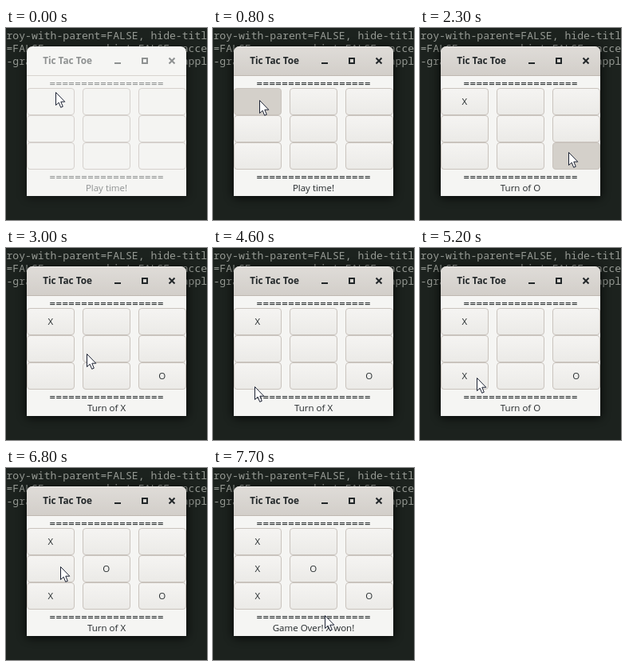
An HTML page that plays this animation: 252x240 px, repeating every 7800 ms.

```html
<!DOCTYPE html>
<html lang="en">
<head>
<meta charset="utf-8">
<title>Tic Tac Toe</title>
<style>
html, body { margin: 0; width: 100%; height: 100%; overflow: hidden; background: #1c221e; }
svg { display: block; width: 252px; height: 240px; }
text { font-family: "Open Sans", "Noto Sans", sans-serif; font-size: 11.5px; white-space: pre; }
.mid { text-anchor: middle; }
.code text { font-family: "Noto Sans Mono", "DejaVu Sans Mono", monospace; font-size: 13.12px; fill: #969a94; }
text.rule { font-family: "Noto Sans Mono", "DejaVu Sans Mono", monospace; font-size: 13.3px; }
text.title { font-size: 11.75px; font-weight: 700; }
</style>
</head>
<body>
<svg viewBox="0 0 252 240" xmlns="http://www.w3.org/2000/svg">
  <defs>
    <linearGradient id="bar" x2="0" y2="1">
      <stop stop-color="#dfdcd8"/><stop offset="1" stop-color="#d2cec9"/>
    </linearGradient>
    <linearGradient id="face" x2="0" y2="1">
      <stop stop-color="#f5f4f2"/><stop offset="1" stop-color="#ebeae7"/>
    </linearGradient>
    <filter id="blur" x="-20%" y="-20%" width="140%" height="140%">
      <feGaussianBlur stdDeviation="6"/>
    </filter>
  </defs>
  <rect width="252" height="240" fill="#1c221e"/>
  <g class="code">
    <text x=".5" y="13.5">roy-with-parent=FALSE, hide-titl</text>
    <text x=".5" y="29.5">=FALSE, urgency-hint=FALSE, acce</text>
    <text x=".5" y="45.5">-gravity=GDK_GRAVITY_NORTH, appl</text>
  </g>
  <rect id="shadow" x="24" y="24" width="204" height="189" rx="7" fill="#000" filter="url(#blur)"/>
  <path d="M26 210V30a7 7 0 0 1 7-7H219a7 7 0 0 1 7 7V210Z" fill="#f5f5f3"/>
  <g id="active">
    <path d="M26 60V30a7 7 0 0 1 7-7H219a7 7 0 0 1 7 7V60Z" fill="url(#bar)"/>
    <path d="M32 23.5H220" stroke="#efedeb"/>
  </g>
  <path id="edge" d="M26 59.5H226"/>
  <g id="ink">
    <text class="title mid" x="77" y="45">Tic Tac Toe</text>
    <path d="M136 43h8v2h-8z"/>
    <path d="M170 37h8v8h-8zM172 39v4h4v-4z" fill-rule="evenodd"/>
    <path id="close" d="M204.5 37.5l7 7m0-7l-7 7" stroke-width="2"/>
    <text class="rule mid" x="126" y="73.5">==================</text>
    <text class="rule mid" x="126" y="190.5">==================</text>
    <text class="mid" id="status" x="126" y="204"></text>
  </g>
  <g id="cells"></g>
  <path id="cursor" d="M.5 .5V16.5L4.2 13.2L6.7 19.3L9.3 18.2L6.8 12.2H11.8Z" fill="#fff" stroke="#1c2233" stroke-linejoin="round"/>
</svg>
<script>
const LOOP = 7800, STEP = 100;
const $ = id => document.getElementById(id);

// cell, mark, press time, release time
const moves = [
  [0, "X", 700, 1000],
  [8, "O", 2300, 2500],
  [6, "X", 4900, 5100],
  [4, "O", 5900, 6200],
  [3, "X", 7000, 7200]
];
const labels = ["Play time!", "Turn of O", "Turn of X", "Turn of O", "Turn of X", "Game Over! X won!"];

// time, x, y of the pointer tip
const path = [
  [0, 62, 80], [100, 62, 80], [200, 58, 90], [1300, 58, 90],
  [1800, 156, 150], [2100, 186, 155], [2500, 186, 155],
  [2900, 102, 139], [3000, 101, 132], [3400, 100, 130], [4000, 100, 130],
  [4600, 52, 173], [5100, 52, 172], [5500, 128, 130], [5800, 138, 126],
  [6000, 138, 126], [6300, 136, 126], [6800, 68, 123], [7200, 68, 124], [7700, 140, 184]
];

function add(parent, name, attrs) {
  const el = document.createElementNS("http://www.w3.org/2000/svg", name);
  for (const key in attrs) el.setAttribute(key, attrs[key]);
  return parent.appendChild(el);
}

const cells = Array.from({ length: 9 }, (_, i) => {
  const x = 26 + i % 3 * 70, y = 75 + Math.floor(i / 3) * 34;
  const box = add($("cells"), "rect", { x: x + .5, y: y + .5, width: 59, height: 33, rx: 3.5 });
  const mark = add($("cells"), "text", { class: "mid", x: x + 29.7, y: y + 21, fill: "#262c2e" });
  return { box, mark };
});

const lerp = (a, b, k) => a + (b - a) * k;
const clamp = v => Math.max(0, Math.min(1, v));
const mix = (a, b, k) => `rgb(${a.map((v, i) => Math.round(lerp(v, b[i], k)))})`;

function pointer(t) {
  const i = path.findIndex(p => p[0] >= t);
  if (i <= 0) return path[0].slice(1);
  const [t0, x0, y0] = path[i - 1], [t1, x1, y1] = path[i];
  const k = (t - t0) / (t1 - t0);
  return [lerp(x0, x1, k), lerp(y0, y1, k)];
}

function draw(t) {
  const focus = clamp((t - 500) / 200);
  const ink = mix([142, 145, 145], [34, 39, 41], focus);
  $("active").setAttribute("opacity", focus);
  $("shadow").setAttribute("opacity", lerp(.4, .65, focus));
  $("edge").setAttribute("stroke", mix([216, 212, 208], [191, 184, 177], focus));
  $("ink").setAttribute("fill", ink);
  $("close").setAttribute("stroke", ink);

  for (const { box, mark } of cells) {
    box.setAttribute("fill", focus > .4 ? "url(#face)" : "#f4f4f2");
    box.setAttribute("stroke", mix([213, 208, 204], [201, 195, 189], focus));
    mark.textContent = "";
  }
  let turn = 0;
  for (const [cell, sign, down, up] of moves) {
    const { box, mark } = cells[cell];
    if (t >= up) {
      mark.textContent = sign;
      turn++;
    } else if (t >= down) box.setAttribute("fill", "#d4d0ca");
  }
  $("status").textContent = labels[turn];
  $("cursor").setAttribute("transform", `translate(${pointer(t).map(Math.round)})`);
}

const start = performance.now();
function tick() {
  const t = (performance.now() - start) % LOOP;
  draw(Math.floor(t / STEP) * STEP);
  requestAnimationFrame(tick);
}
tick();
</script>
</body>
</html>
```
